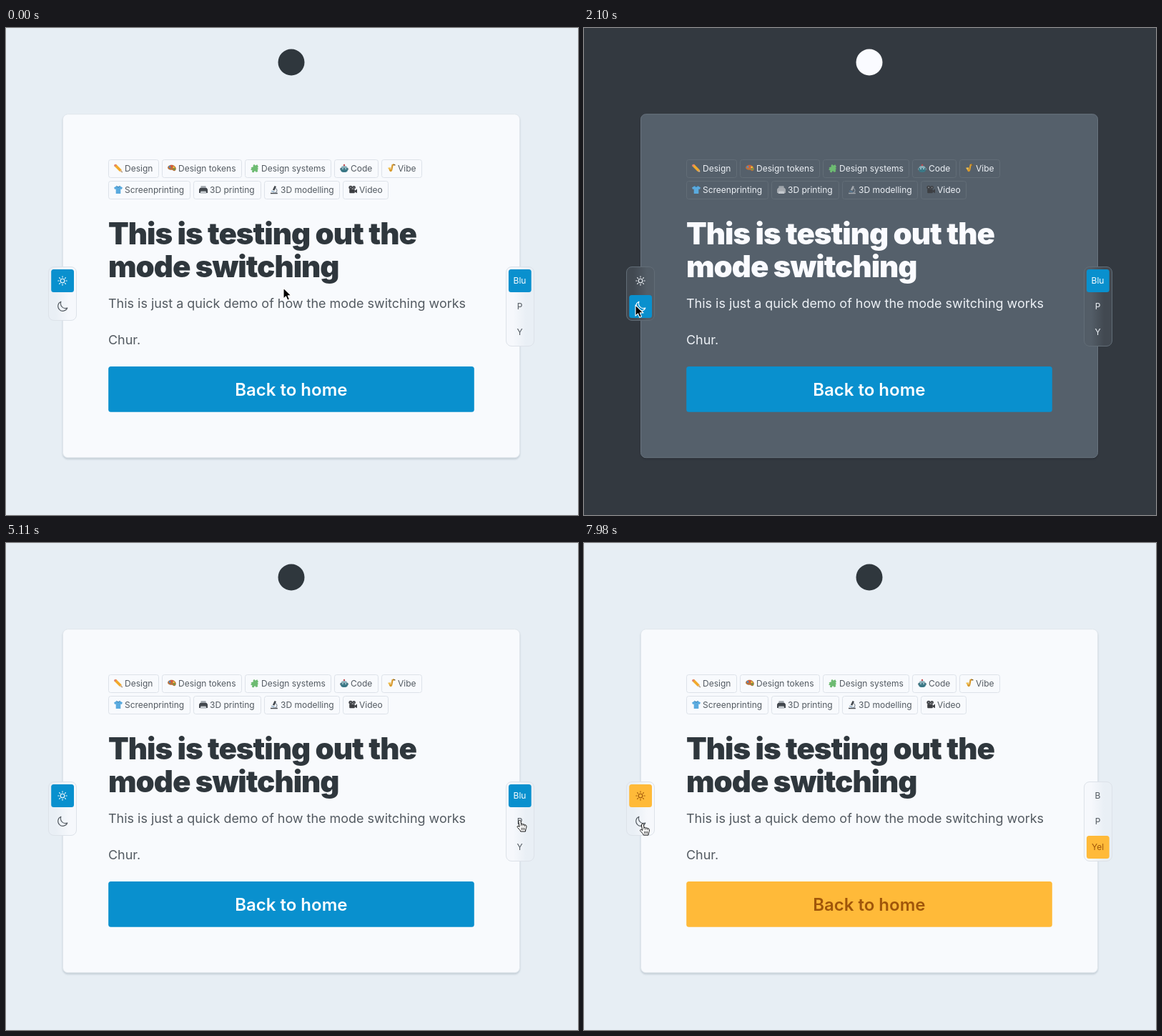
An HTML page that plays this animation: 800x682 px, repeating every 8000 ms.

```html
<!DOCTYPE html>
<html lang="en">
<head>
<meta charset="utf-8">
<title>Mode switching</title>
<style>
html, body { margin: 0; width: 100%; height: 100%; overflow: hidden; }
body {
  --bg: #e7eef4; --card: #f8fafd; --edge: #dfe5eb; --line: #dde2e9;
  --head: #2f373d; --text: #535a61; --panel-out: #e9eff5; --panel-in: #f6f8fc;
  --shadow: rgba(60, 80, 100, .2); --tool: #43484e;
  background: var(--bg);
}
body.dark {
  --bg: #333940; --card: #55606b; --edge: #68737e; --line: #626d77;
  --head: #fafbff; --text: #edf1f6; --panel-out: #424951; --panel-in: #535d67;
  --shadow: rgba(20, 25, 30, .25); --tool: #a4a9af;
}
body.blue { --accent: #0990ce; --on: #fafdff; }
body.pink { --accent: #e0458f; --on: #fff8fc; }
body.yellow { --accent: #ffba39; --on: #a0560a; }
svg { display: block; position: absolute; left: 0; top: 0; }
text { font-family: Inter, "Open Sans", sans-serif; font-optical-sizing: none; fill: var(--text); }
.card { fill: var(--card); stroke: var(--edge); filter: drop-shadow(0 2px 1px var(--shadow)); }
.logo { fill: var(--head); }
.tag { font-size: 12px; }
.pill { fill: none; stroke: var(--line); }
.title { font-size: 42px; font-weight: 900; letter-spacing: -.024em; fill: var(--head); }
.copy { font-size: 17.95px; }
.action { font-size: 24px; font-weight: 600; text-anchor: middle; fill: var(--on); }
.accent { fill: var(--accent); }
.panel { stroke: var(--line); }
.out { stop-color: var(--panel-out); }
.in { stop-color: var(--panel-in); }
.label { font-size: 12px; text-anchor: middle; }
.label.on { fill: var(--on); }
.icon { fill: none; stroke: var(--text); stroke-width: 1.6; stroke-linecap: round; stroke-linejoin: round; }
.icon.on { stroke: var(--on); }
.tool { fill: var(--tool); }
</style>
</head>
<body class="blue">
<svg width="800" height="682" viewBox="0 0 800 682">
  <defs>
    <linearGradient id="left">
      <stop class="out" offset=".25"/><stop class="in" offset=".75"/>
    </linearGradient>
    <linearGradient id="right">
      <stop class="in" offset=".25"/><stop class="out" offset=".72"/>
    </linearGradient>
  </defs>

  <circle class="logo" cx="399" cy="48" r="18.5"/>
  <rect class="card" x="79.5" y="120.7" width="639" height="481" rx="7"/>
  <g id="tags"></g>

  <text class="title" x="143" y="303">This is testing out the</text>
  <text class="title" x="143" y="349">mode switching</text>
  <text class="copy" x="143" y="392">This is just a quick demo of how the mode switching works</text>
  <text class="copy" x="143" y="443">Chur.</text>
  <rect class="accent" x="143.2" y="474.1" width="511.6" height="63.6" rx="3.5"/>
  <text class="action" x="398.8" y="515">Back to home</text>

  <rect class="panel" fill="url(#left)" x="59.5" y="334.5" width="39" height="75" rx="7.5"/>
  <rect id="modeMark" class="accent" x="63.2" width="31.8" height="31.8" rx="3.5"/>
  <g id="sun" class="icon" transform="translate(79 354) scale(.7)"><circle r="4"/></g>
  <path id="moon" class="icon" transform="translate(79 390) scale(.7) translate(-12 -12)"
    d="M21.75 15A9.7 9.7 0 0 1 18 15.75 9.75 9.75 0 0 1 8.25 6Q8.25 4 9 2.25A9.75 9.75 0 1 0 21.75 15z"/>

  <rect class="panel" fill="url(#right)" x="699.5" y="334.5" width="39" height="111" rx="7.5"/>
  <rect id="hueMark" class="accent" x="702.9" width="31.8" height="31.8" rx="3.5"/>
  <g id="hues"></g>

  <g id="cursor">
    <path id="arrow" d="M0 0V15.2L3.5 11.9 5.8 17.3 8.5 16.1 6.2 10.9H11z"
      stroke="#fff" stroke-width="1.1" stroke-linejoin="round"/>
    <g id="hand" fill="#fff" stroke="#111" stroke-width="1" stroke-linejoin="round" stroke-linecap="round">
      <path d="M-1.7 1.6C-1.7-.4 1.3-.4 1.5 1.5L2 6C2.5 5 4.2 5 4.5 6.3 5 5.6 6.7 5.7 7 7 7.8 6.5 9.4 7 9.4 8.5 9.6 11 8.5 12.5 8.2 14L8 16H1.2C.8 14.5-1 12.5-3 10.5-4.2 9.2-3 7.6-1.2 8.8L-.6 9.3z"/>
      <path d="M2 6V8M4.5 6.4V8.2M7 7.2V8.6M2.6 11V13.6M4.6 11V13.6M6.6 11V13.6" fill="none" stroke-width=".8"/>
    </g>
  </g>
</svg>
<script>
const $ = id => document.getElementById(id);

// Small pictures, each in a 12 by 12 box.
const art = {
  pencil: `<path d="M.5 1L3 .3 10.6 8 8 10.5.5 3z" fill="#f2a92b"/><path d="M.5 3L.3 1.5 2 .2 3.4 1.2 1.5 3.6z" fill="#e2777c"/>
    <path d="M8 10.5L10.6 8 11.8 11.8z" fill="#d9b48a"/><path d="M10.5 11.4L11.4 10.5 11.8 11.8z" fill="#333"/>`,
  palette: `<path d="M1 3C4-.3 11 1 11.8 6 12.2 9.5 9 10.8 7.6 9 6.4 7.4 5 9 3 8 0 7-.6 4.6 1 3z" fill="#b9713c"/>
    <circle cx="3" cy="4" r="1.2" fill="#3f8fe0"/><circle cx="5.8" cy="3" r="1.2" fill="#e8483f"/>
    <circle cx="8.6" cy="4.4" r="1.2" fill="#f4cf3c"/><circle cx="9.6" cy="7.3" r="1.2" fill="#57ad4a"/>`,
  puzzle: `<path d="M.5 5L4 3.8C2.6 1 5.6-.4 6.6 2.2L9.4.8 11 4.2 8.8 5.4C10.6 5 11.6 7.6 9.6 8.2L10.4 10.6 7.4 11.6C7.2 9 4.6 9 5 11.8L2 11.4 2.4 8.6C0 9.2-.4 7 1.6 6.6z" fill="#6dbb72"/>`,
  robot: `<rect y="5.4" width="12" height="3.2" rx="1.2" fill="#7d8f97"/><path d="M1.2 6C1.4 1.4 10.6 1.4 10.8 6z" fill="#8fb0ba"/>
    <circle cx="6" cy="1.5" r="1.2" fill="#c2474d"/><path d="M1.2 5.6H10.8V9.6Q10 11.4 8 11.4H4Q2 11.4 1.2 9.6z" fill="#3b7886"/>
    <circle cx="4" cy="6.6" r=".9" fill="#cfe3e8"/><circle cx="8" cy="6.6" r=".9" fill="#cfe3e8"/>`,
  sax: `<path d="M9.8 .8L7.6 1.4 6.3 8C5.8 10.4 4 10.2 3.8 7.2" fill="none" stroke="#d89a2d" stroke-width="2.2"/>
    <path d="M1 5.2L5 4.7 4.8 7.6 2.6 7.8z" fill="#efbd4c"/><path d="M9 .6L11.4 1.6" stroke="#7a5a2a" stroke-width="1.2"/>`,
  shirt: `<path d="M3.6 .8Q6 2.6 8.4 .8L12 3 10.8 5.6 9.3 5V11.6H2.7V5L1.2 5.6 0 3z" fill="#5aaade"/>
    <path d="M3.6 .8Q6 3.8 8.4 .8" fill="none" stroke="#377fb2"/>`,
  printer: `<path d="M2.6 .8H9.4L10 4.4H2z" fill="#9ea4aa"/>
    <path class="tool" d="M1.4 3.6H10.6L12 5.6V10.4H0V5.6z"/><path d="M2.4 8H9.6L10.4 11.4H1.6z" fill="#c4c9ce"/>`,
  scope: `<path class="tool" d="M6.6 .4L9 1.4 6.3 7.2 3.9 6.2zM1 10.2H10.8V11.8H1z"/>
    <path d="M8 4C11 6 10.5 9 7.4 10.4" fill="none" stroke="#8b959f" stroke-width="1.3"/><path d="M2.2 7.8L6.6 9.2" stroke="#5a89b0"/>`,
  camera: `<g fill="#3d3f43"><circle cx="3" cy="2.8" r="2.6"/><circle cx="7.6" cy="2.8" r="2.3"/><rect x="1.2" y="5" width="7.6" height="5.8" rx="1"/>
    <path d="M8.8 7.2L12 5V10.8L8.8 9z"/></g><circle cx="3" cy="2.8" r="1" fill="#85898e"/><circle cx="7.6" cy="2.8" r=".9" fill="#85898e"/>`
};

const tags = [
  [143, 71, 0, "Design", "pencil"], [218, 112, 0, "Design tokens", "palette"],
  [334, 121, 0, "Design systems", "puzzle"], [459, 62, 0, "Code", "robot"], [525, 57, 0, "Vibe", "sax"],
  [143, 115, 1, "Screenprinting", "shirt"], [262, 95, 1, "3D printing", "printer"],
  [361, 106, 1, "3D modelling", "scope"], [471, 64, 1, "Video", "camera"]
];
$("tags").innerHTML = tags.map(([x, w, row, name, pic]) => `
  <g transform="translate(${x} ${184 + row * 30})">
    <rect class="pill" x=".5" y=".5" width="${w - 1}" height="25" rx="3"/>
    <g transform="translate(8 6.5)">${art[pic]}</g>
    <text class="tag" x="23" y="17">${name}</text>
  </g>`).join("");

for (let a = 0; a < 360; a += 45)
  $("sun").innerHTML += `<path d="M0-7V-8.9" transform="rotate(${a})"/>`;

const hues = ["blue", "pink", "yellow"];
const names = ["Blu", "Pin", "Yel"];
$("hues").innerHTML = names.map((n, i) =>
  `<text class="label" x="718.5" y="${358.2 + i * 36}">${n}</text>`).join("");

// Pointer path: time, x, y
const path = [
  [0, 388, 364], [840, 104, 384], [1330, 72, 388], [2870, 72, 388], [3150, 76, 357],
  [4060, 76, 357], [4550, 640, 380], [4620, 640, 380], [4900, 718.5, 388],
  [5530, 718.5, 388], [6020, 719, 434], [6090, 719, 434], [6440, 718, 425],
  [7350, 718, 425], [7560, 450, 400], [7700, 450, 400], [7980, 82, 393]
];
// The pointer is a plain arrow for a moment after each click.
const clicks = [[2030, 2240], [3500, 3780], [5180, 5600], [6790, 7210]];
const LOOP = 8000, STEP = 70;

function place(t) {
  const i = path.findIndex(p => p[0] > t);
  if (i < 0) return path[path.length - 1].slice(1);
  const [t0, x0, y0] = path[i - 1], [t1, x1, y1] = path[i];
  const u = (t - t0) / (t1 - t0), k = u * u * (3 - 2 * u);
  return [x0 + (x1 - x0) * k, y0 + (y1 - y0) * k];
}

function draw(now) {
  const t = Math.floor(now % LOOP / STEP) * STEP;
  const dark = t >= 2100 && t < 3500;
  const hue = t < 5180 ? 0 : t < 6790 ? 1 : 2;
  document.body.className = hues[hue] + (dark ? " dark" : "");

  $("modeMark").setAttribute("y", dark ? 374.1 : 338.1);
  $("sun").classList.toggle("on", !dark);
  $("moon").classList.toggle("on", dark);
  $("hueMark").setAttribute("y", 338.1 + hue * 36);
  [...$("hues").children].forEach((label, i) => {
    label.textContent = i === hue ? names[i] : names[i][0];
    label.classList.toggle("on", i === hue);
  });

  const [x, y] = place(t);
  const over = y > 338 && (x > 63 && x < 95 && y < 406 || x > 702 && x < 735 && y < 442);
  const hand = over && !clicks.some(([a, b]) => t >= a && t < b);
  $("hand").style.display = hand ? "" : "none";
  $("arrow").style.display = hand ? "none" : "";
  $("cursor").setAttribute("transform", `translate(${x} ${y})`);
}

function tick() {
  draw(performance.now());
  requestAnimationFrame(tick);
}
tick();
</script>
</body>
</html>
```
